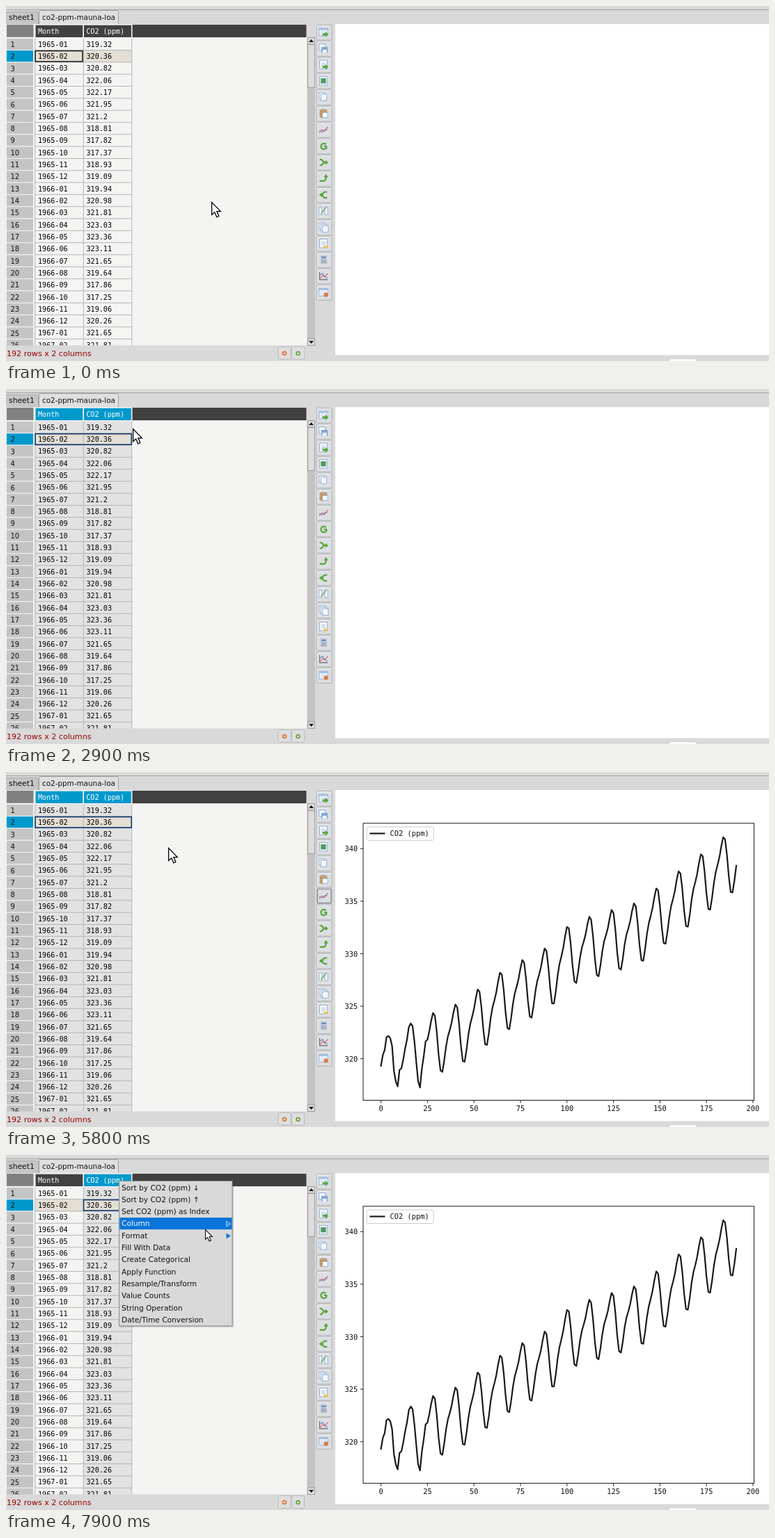
Recreate the animation shown at these times as an HTML page. Size 1096x511 px, loop 8000 ms.

```html
<!DOCTYPE html>
<html lang="en">
<head>
<meta charset="utf-8">
<title>CO2 table and plot</title>
<style>
html, body { margin: 0; width: 100%; height: 100%; overflow: hidden; background: #d9d9d9; }
svg { display: block; width: 100%; height: 100%; }
text { font-family: "DejaVu Sans", sans-serif; font-size: 10.6px; fill: #111; white-space: pre; }
.mono { font-family: "DejaVu Sans Mono", monospace; font-size: 10.1px; fill: #000; }
.axis { font-family: "DejaVu Sans Mono", monospace; font-size: 10.4px; }
</style>
</head>
<body>
<svg id="stage" viewBox="0 0 1096 511" preserveAspectRatio="none"></svg>
<script>
const LOOP = 8000, STEP = 100;
const BLUE = '#0099cc', DARK = '#404040', NAVY = '#12386f', GREEN = '#55a63a';
const ROW = 17.32, TOP = 46.3, HEAD = 27.6;
const COLS = [{ x: 42, w: 68.7, name: 'Month' }, { x: 111.3, w: 69, name: 'CO2 (ppm)' }];

const attrs = o => Object.entries(o).map(([k, v]) => ` ${k}="${v}"`).join('');
const rect = (x, y, w, h, fill, more = {}) => `<rect${attrs({ x, y, width: w, height: h, fill, ...more })}/>`;
const path = (d, stroke, w = 1, fill = 'none', more = {}) =>
  `<path${attrs({ d, stroke, 'stroke-width': w, fill, ...more })}/>`;
const shape = (d, fill) => path(d, 'none', 0, fill);
const text = (x, y, s, more = {}) => `<text${attrs({ x, y, ...more })}>${s}</text>`;
const circle = (cx, cy, r, fill) => `<circle${attrs({ cx, cy, r, fill })}/>`;
const group = (id, body, more = {}) => `<g${attrs({ id, ...more })}>${body}</g>`;
const mix = (a, b, f) => a + (b - a) * f;

// Readings visible in the table; later months follow trend + season
const shown = ('319.32 320.36 320.82 322.06 322.17 321.95 321.2 318.81 317.82 317.37 318.93 319.09 ' +
  '319.94 320.98 321.81 323.03 323.36 323.11 321.65 319.64 317.86 317.25 319.06 320.26 321.65 321.81').split(' ');

function trend(year) {
  const levels = [[1967, 321.4], [1968, 322.2], [1970, 325.4], [1972, 327.6], [1973, 329.9], [1976, 331.8], [1980, 338.3]];
  let i = levels.findIndex(l => l[0] > year);
  i = i < 0 ? levels.length - 1 : Math.max(i, 1);
  const [[y0, v0], [y1, v1]] = [levels[i - 1], levels[i]];
  return mix(v0, v1, (year - y0) / (y1 - y0));
}

function season(month) {
  const a = month * Math.PI / 6;
  return .29 - .4 * Math.cos(a) + 2.63 * Math.sin(a) + .48 * Math.cos(2 * a) - .69 * Math.sin(2 * a);
}

const reading = i => i < shown.length ? +shown[i] : trend(1965 + (i - 6.5) / 12) + season(i % 12);

function windowBase() {
  return rect(0, 0, 1096, 511, '#d9d9d9') + rect(0, 5, 1096, 1, '#a3a3a3') +
    rect(0, 8, 46, 18, '#c6c6c6') + path('M0 8.5H44Q46.5 8.5 46.5 11V26', '#a8a8a8') +
    path('M47.5 26V8Q47.5 6.5 49 6.5H159.5Q161.5 6.5 161.5 8.5V26', '#a3a3a3', 1, '#dfdfdf') +
    text(4, 20, 'sheet1', { style: 'font-size:10.8px' }) +
    text(52, 20, 'co2-ppm-mauna-loa', { style: 'font-size:10.4px' }) +
    rect(473, 26, 623, 476.5, '#fff') + rect(953, 508.5, 38, 6, '#fff', { rx: 2 });
}

function table() {
  let s = rect(0, 26, 432, 463, '#f4f4f3') + rect(181, HEAD - .8, 250.5, 18.3, DARK) +
    rect(1, HEAD - .8, 38.5, 18, '#808080');
  COLS.forEach((c, i) => {
    s += rect(c.x, HEAD, c.w, 17.4, DARK, { id: 'head' + i }) +
      text(c.x + 4, 39.5, c.name, { class: 'mono', style: 'fill:#fff' }) +
      rect(c.x, TOP, c.w, 443, '#f4f4f3', { id: 'col' + i }) + rect(c.x, TOP + ROW, c.w, ROW, '#e4ded4');
  });
  shown.forEach((value, i) => {
    const y = TOP + i * ROW, month = `${1965 + Math.floor(i / 12)}-${String(i % 12 + 1).padStart(2, 0)}`;
    s += rect(.5, y, 39, ROW, i === 1 ? BLUE : '#c4c4c4', { stroke: '#f6f6f6', 'stroke-width': .9 }) +
      rect(42, y + ROW - .5, 139, .9, '#abb1ad') +
      text(6.5, y + 12.6, i + 1, { style: 'font-size:10px' }) +
      text(46, y + 12.5, month, { class: 'mono' }) + text(115.5, y + 12.5, value, { class: 'mono' });
  });
  [41.3, 110.8, 180.3].forEach(x => {
    s += rect(x, TOP, .9, 443, '#abb1ad') + rect(x - .4, HEAD - .8, 1.6, 18.2, '#f4f4f4');
  });
  return s + rect(42.5, 64.6, 67, 15.4, 'none', { id: 'focus', 'stroke-width': 1.6 });
}

function statusBar() {
  const key = (x, c) => rect(x, 490.5, 18, 18, '#dedede', { rx: 1.5, stroke: '#b4b4b4', 'stroke-width': .8 }) +
    circle(x + 9, 500, 3.3, c) + circle(x + 9, 500, 1.5, '#eee8d8');
  return rect(0, 488.5, 444, 22.5, '#d9d9d9') +
    text(1, 504, '192 rows x 2 columns', { style: 'fill:#990000;font-size:11.1px' }) +
    key(391, '#d9753a') + key(410.5, '#66a544');
}

function scrollbar() {
  const end = (y, d) => rect(433.5, y, 10, 9.5, '#dcdcdc', { stroke: '#9a9a9a' }) + shape(d, '#111');
  return rect(432, 26, 13, 462.5, '#d9d9d9') + rect(433, 45, 11, 443, '#c3c3c3') +
    end(45.5, 'M435 52h7l-3.5-4z') + end(479, 'M435 482h7l-3.5 4z') +
    rect(433.5, 55.5, 10, 62, '#dcdcdc', { stroke: '#9a9a9a' });
}

// Toolbar icons live in a 22 px box
const sheet = (x = 4, y = 3, w = 13, h = 15) => rect(x, y, w, h, '#f4f8fd', { stroke: '#86a5cf' });
const rules = path('M7 8h7M7 10.5h7M7 13h7', '#a3bcdd');
const grid = sheet(3, 4, 15, 13) + rect(3, 4, 15, 3, '#a4c0e4') + path('M3 10.5H18M3 13.5H18M8 7V17M13 7V17', '#bacde6', .8);
const go = shape('M9 12.5h5v-3l5 5-5 5v-3H9z', GREEN);
const bend = (line, tip) => path(line, GREEN, 2.6) + shape(tip, GREEN);
const trace = (d, c) => path(d, c, 1.3);
const copies = n => Array.from({ length: n }, (_, i) => sheet(3 + i * 3, 3 + i * 2.5, 10, 11)).join('');
const icons = [
  grid + go,
  sheet(3, 3, 11, 11) + rect(7, 8, 11, 10, '#82a7da') + rect(9, 13, 7, 5, '#f4f8fd'),
  sheet() + rules + go,
  sheet() + rect(6, 6, 9, 9, '#4f9a62'),
  copies(2),
  rect(4, 4, 13, 14, '#c8995c', { rx: 1.5 }) + rect(7, 3, 7, 3, '#aaa') + sheet(9, 9, 9, 9),
  trace('M3 16l5-5 4 3 6-8', '#d55') + trace('M3 12l5 3 5-5 5 1', '#6a8fcf'),
  bend('M15 8A5 5 0 1 0 15.5 14', 'M10 10h7v6z'),
  bend('M4 6h3l5 5h4M4 16h3l5-5', 'M14 7l5 4-5 4z'),
  bend('M4 15h7q4 0 4-7', 'M11 9l4-6 4 6z'),
  bend('M17 6h-5l-4 5 4 5h5', 'M8 7l-5 4 5 4z'),
  sheet(3, 4, 5, 13) + sheet(13, 4, 5, 13) + trace('M6 15l9-10', GREEN),
  copies(3),
  sheet() + rules + shape('M10 18l3-5 2 3 3-3 1 5z', '#eec04c'),
  rect(5, 3, 12, 15, '#c4cddb', { rx: 1 }) + rect(7, 5, 8, 3, '#6d8dbd') +
    path('M7 11h8M7 13.5h8M7 16h8', '#7a879c', 1.3, 'none', { 'stroke-dasharray': '2 1' }),
  trace('M4 4V17H18', '#666') + trace('M5 9l4-3 5 7 4 1', '#5a84c9') + trace('M5 15l4-5 4 2 5-6', '#d55'),
  grid + circle(15, 15, 3.8, '#e07a45')
];
const PLOT = 6;

function toolbar() {
  return icons.map((icon, i) => {
    const plot = i === PLOT;
    return `<g transform="translate(446 ${(27 + i * 23.4).toFixed(1)})">` +
      rect(.5, .5, 21.5, 21.5, '#dcdee1', { rx: 1, stroke: '#adafb2' }) + path('M1.5 21V1.5H21', '#f2f3f4') +
      (plot ? rect(1, 1, 20.5, 20.5, '#ececec', { id: 'hover' }) : '') +
      group('icon' + i, icon, { transform: 'translate(1.2 1.8) scale(.83)' }) +
      (plot ? rect(1.5, 1.5, 19.5, 19.5, 'none', { id: 'ring', stroke: '#222', 'stroke-dasharray': '1 1' }) : '') + '</g>';
  }).join('');
}

function chart() {
  const px = i => 538.6 + i * 2.672, py = v => 110.3 + (340 - v) * 15.12;
  let s = rect(513, 73.8, 561.5, 398.7, '#fff', { stroke: '#1a1a1a' });
  for (let v = 0; v <= 200; v += 25)
    s += path(`M${px(v)} 472.5v4`, '#1a1a1a') + text(px(v), 487.5, v, { class: 'axis', 'text-anchor': 'middle' });
  for (let v = 320; v <= 340; v += 5)
    s += path(`M513 ${py(v)}h-4`, '#1a1a1a') + text(505.3, py(v) + 4, v, { class: 'axis', 'text-anchor': 'end' });
  const points = Array.from({ length: 192 }, (_, i) => px(i).toFixed(1) + ' ' + py(reading(i)).toFixed(1));
  return s + path('M' + points.join('L'), '#1a1a1a', 2.2, 'none', { 'stroke-linejoin': 'round', 'stroke-linecap': 'square' }) +
    rect(518.2, 79, 96, 19.5, '#fff', { rx: 2.5, stroke: '#ccc' }) +
    path('M522.5 88.5H544.5', '#1a1a1a', 2.2) + text(551.5, 92, 'CO2 (ppm)', { class: 'axis' });
}

const items = ['Sort by CO2 (ppm) ↓', 'Sort by CO2 (ppm) ↑', 'Set CO2 (ppm) as Index', 'Column', 'Format',
  'Fill With Data', 'Create Categorical', 'Apply Function', 'Resample/Transform', 'Value Counts',
  'String Operation', 'Date/Time Conversion'];
const itemY = i => 38.2 + i * ROW;

function menu() {
  return rect(163.5, 38.5, 163.5, 209.5, '#000', { opacity: .18 }) +
    rect(162.5, 37.5, 162.5, 208.5, '#d9d9d9', { stroke: '#8c8c8c' }) +
    rect(163.3, 0, 161.4, 17, '#0a74d9', { id: 'bar' }) +
    items.map((s, i) => text(166, itemY(i) + 12.3, s, { id: 'item' + i })).join('') +
    [3, 4].map(i => path(`M316.5 ${itemY(i) + 5}v8l6.5-4z`, 'none', .8, '#1478d4', { id: 'sub' + i })).join('');
}

const tip = rect(465.5, 175.5, 65.5, 13, '#ffffe0', { stroke: '#111' }) +
  text(468, 185.5, 'plot selected', { style: 'font-size:9.4px' });
const arrow = path('M.6.6V18.5L4.7 14.8L7.7 21.8L10.8 20.5L7.8 13.6H13.2Z', '#000', 1.3, '#fff');
const split = path('M-1.5-7V7M1.5-7V7M-3 0H-7M3 0H7M-5-2.5L-7.5 0L-5 2.5M5-2.5L7.5 0L5 2.5', '#111', 1.3);

document.getElementById('stage').innerHTML = windowBase() + table() + statusBar() + scrollbar() + toolbar() +
  group('chart', chart()) + group('menu', menu()) + group('tip', tip) +
  group('split', split, { transform: 'translate(189 36)' }) + group('arrow', arrow);

const $ = id => document.getElementById(id);
const show = (id, on) => $(id).setAttribute('visibility', on ? 'visible' : 'hidden');
const set = (id, o) => { for (const k in o) $(id).setAttribute(k, o[k]); };
const within = (t, from, to) => t >= from && t < to;

// Pointer moves: [arrival, steps, x, y]
const moves = [[500, 4, 222, 139], [2100, 8, 90, 38], [2400, 1, 106, 34], [2900, 1, 182, 57],
  [3200, 2, 380, 137], [3500, 2, 443, 172], [3700, 1, 452, 183], [5000, 1, 452, 173], [5100, 1, 320, 119],
  [5300, 1, 283, 110], [5800, 1, 233, 109], [6100, 1, 214, 88], [6300, 1, 169, 47], [6500, 1, 161, 37],
  [7600, 2, 216, 56], [7900, 2, 286, 107]];

function pointer(t) {
  const now = Math.floor(t / STEP) * STEP;
  let x = 295, y = 282;
  for (const [end, steps, tx, ty] of moves) {
    const f = Math.min(1, Math.max(0, 1 - (end - now) / (steps * STEP)));
    const ease = f * f * (3 - 2 * f);
    x = mix(x, tx, ease);
    y = mix(y, ty, ease);
  }
  return [x, y];
}

function drawSelection(t) {
  const head = [within(t, 2200, 6600), t >= 2900];
  const cells = [within(t, 2200, 5900), within(t, 2900, 5900) || t >= 6600];
  COLS.forEach((c, i) => {
    set('head' + i, { fill: head[i] ? BLUE : DARK });
    set('col' + i, { fill: cells[i] ? '#e2e2e2' : '#f4f4f3' });
  });
  const left = t >= 6600 ? 111.5 : 42;
  const right = t >= 2900 ? 180.2 : 110;
  set('focus', { x: left, width: right - left, stroke: t < 2200 ? '#222' : NAVY });
  show('focus', !within(t, 5900, 6600));
}

function drawMenu(t) {
  const row = [7500, 7600, 7800, 7900].filter(start => t >= start).length - 1;
  $('menu').style.display = t >= 7200 ? '' : 'none';
  $('bar').style.display = row < 0 ? 'none' : '';
  set('bar', { y: itemY(Math.max(row, 0)) });
  items.forEach((_, i) => { $('item' + i).style.fill = i === row ? '#fff' : '#111'; });
  set('sub3', { fill: row === 3 ? '#3d92e4' : '#1478d4', stroke: row === 3 ? '#a9d2f7' : 'none' });
}

function draw(t) {
  drawSelection(t);
  drawMenu(t);
  show('chart', t >= 4200);
  show('hover', within(t, 3700, 5100));
  show('tip', within(t, 3700, 5100));
  show('ring', within(t, 4100, 7200));

  const [x, y] = pointer(t), resizing = within(t, 6600, 7200);
  set('arrow', { transform: `translate(${x} ${y}) scale(${t >= 7200 ? .78 : 1})` });
  show('arrow', !resizing);
  show('split', resizing);
}

const start = performance.now();
function tick(now) {
  draw(Math.max(0, now - start) % LOOP);
  requestAnimationFrame(tick);
}
draw(0);
requestAnimationFrame(tick);
</script>
</body>
</html>
```
